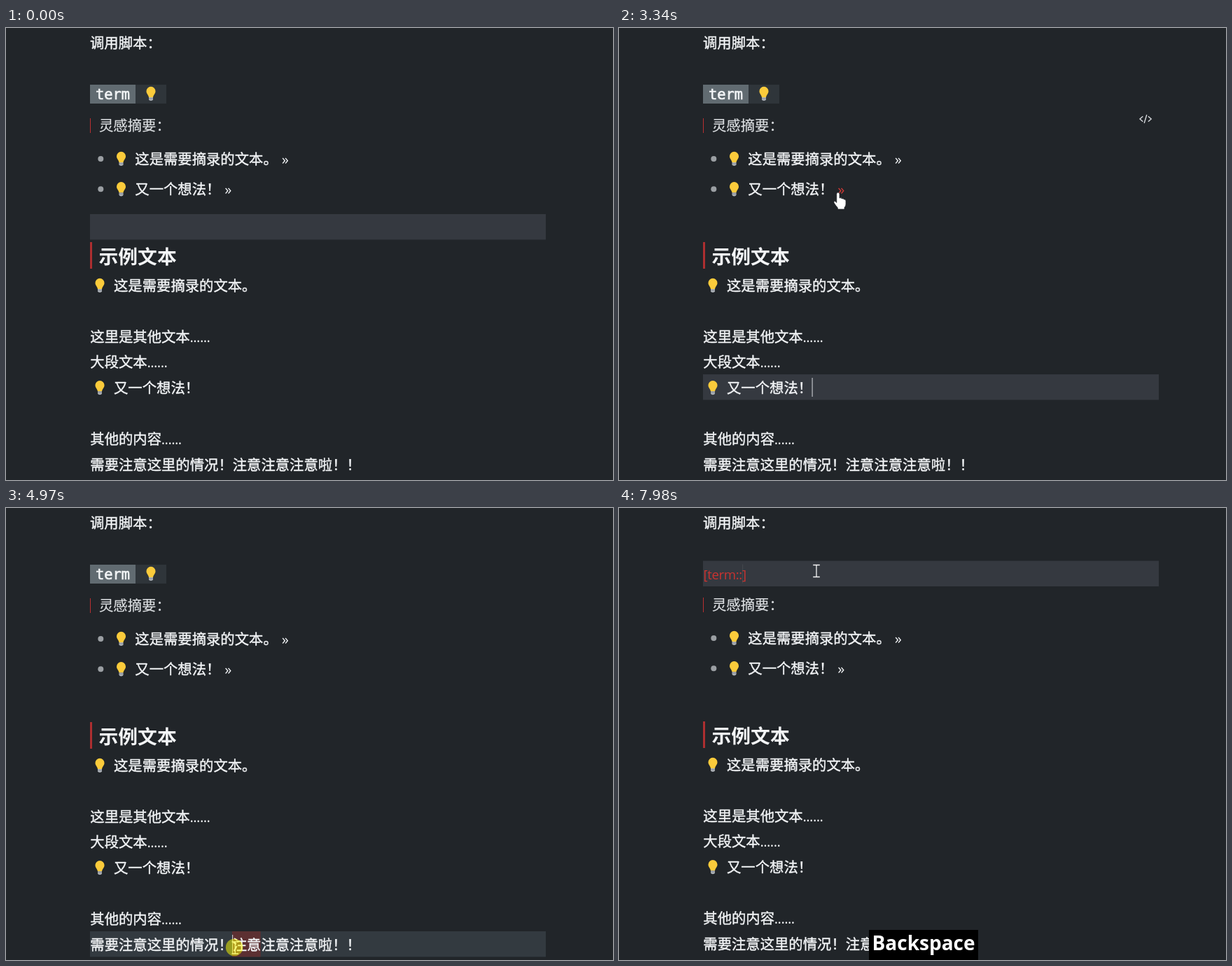
These frames come from a looping animation (867x646 px, 8000 ms). An HTML page:

```html
<!DOCTYPE html>
<html lang="zh-CN">
<head>
<meta charset="utf-8">
<title>灵感摘要</title>
<style>
html, body { margin: 0; width: 100%; height: 100%; overflow: hidden; background: #212529; }
svg { position: absolute; left: 0; top: 0; display: block; }
text {
  font: 500 20.35px "Noto Sans CJK SC", "Noto Sans CJK", "Noto Sans", sans-serif;
  fill: #f3f5f7; stroke: #f3f5f7; stroke-width: .4px;
}
.latin { font-family: "Open Sans", "Noto Sans", sans-serif; font-weight: 400; stroke: none; }
.dots { letter-spacing: -.6px; }
.dim { fill: #dcdfe2; stroke: #dcdfe2; stroke-width: .2px; }
.head { font-size: 27.8px; font-weight: 700; stroke: none; }
.mono { font-family: "DejaVu Sans Mono", monospace; font-weight: 400; stroke-width: .7px; }
.red { fill: #c93330; font-size: 18.6px; letter-spacing: -.35px; }
.hover { fill: #d13a36; }
#keys {
  position: absolute; left: 435px; top: 603px; height: 43px; padding: 0 4.5px;
  transform: translateX(-50%); background: #000; color: #fff; white-space: pre;
  font: 700 28px/43px "Open Sans", "Noto Sans", sans-serif; word-spacing: 4px;
}
</style>
</head>
<body>
<svg width="867" height="646" viewBox="0 0 867 646">
  <defs>
    <g id="bulb" transform="scale(.93 .97)">
      <path d="M-7 -3.6A7 6.9 0 0 1 7 -3.6C7 0 3.7 1.8 3.3 5.2H-3.3C-3.7 1.8 -7 0 -7 -3.6Z" fill="#fbcb3b"/>
      <path d="M-3.2 5.2H3.2V8.6Q2.6 10.4 0 10.4T-3.2 8.6Z" fill="#adb2b8"/>
      <path d="M-3.2 7.2H3.2" stroke="#858b92"/>
    </g>
  </defs>
  <rect id="active" x="120" width="651" height="36.5"/>
  <rect id="selection" y="605" height="36.5" fill="#5c3032"/>
  <text x="120" y="28.7">调用脚本：</text>
  <g id="badge">
    <rect x="120" y="81" width="65" height="27" fill="#616b71"/>
    <rect x="185" y="81" width="44" height="27" fill="#2f353a"/>
    <text class="mono" x="128" y="101.5">term</text>
    <use href="#bulb" x="207" y="94"/>
  </g>
  <g id="edit">
    <text class="latin red" x="120.5" y="101.5">[term::</text>
    <use id="idea" href="#bulb" x="193" y="94"/>
    <text id="close" class="latin red" y="101.5">]</text>
  </g>
  <g id="page">
    <rect x="120" y="129" width="1" height="21" fill="#b83030"/>
    <text class="dim" x="133" y="147.4">灵感摘要：</text>
    <rect x="120" y="306" width="3" height="38" fill="#ad2f30"/>
    <text class="head" x="132.5" y="336.7">示例文本</text>
  </g>
  <path id="code" d="M748.3 126.3L744 130L748.3 133.7M753.8 124L750.2 136M755.9 126.3L760.2 130L755.9 133.7" fill="none" stroke="#d5d8db" stroke-width="1.4"/>
  <rect id="caret" width="1.2" height="27" fill="#dfe2e5"/>
  <g id="cursor">
    <path id="beam" d="M-4.8 -8.5H4.8M0 -8.5V8.5M-4.8 8.5H4.8" fill="none" stroke="#f4f4f4" stroke-width="1.3"/>
    <path id="hand" d="M-2.2 2.2A2.1 2.1 0 0 1 2 2.2V8Q4.6 6.9 5.2 9Q7.7 8 8.3 10Q11 9.4 11 12V17Q11 19.6 9 21.5V24H-.6V22Q-3 19.4 -6 14.8Q-6.6 12.4 -4.4 12.6L-2.2 14.6Z" fill="#fff" stroke="#212529" stroke-width=".7"/>
    <circle id="press" cx="-1.2" cy="-.5" r="12.3" fill="#ff0" opacity=".5"/>
  </g>
</svg>
<div id="keys"></div>
<script>
const LOOP = 8000, EM = 20.35;
const $ = id => document.getElementById(id);
const show = (id, on) => $(id).style.display = on ? "" : "none";
const set = (el, attrs) => { for (const k in attrs) el.setAttribute(k, attrs[k]); };

function add(tag, attrs, text = "") {
  const el = document.createElementNS("http://www.w3.org/2000/svg", tag);
  set(el, attrs);
  el.textContent = text;
  return $("page").appendChild(el);
}
const bulb = (x, y) => add("use", { href: "#bulb", x, y });

// Summary list with a jump link after each idea
const links = ["这是需要摘录的文本。", "又一个想法！"].map((s, i) => {
  const y = 187 + 43.3 * i, x = 190.2 + s.length * EM;
  add("circle", { cx: 135.3, cy: y, r: 4, fill: "#9b9fa3" });
  bulb(164.5, y);
  add("text", { x: 184.3, y: y + 7.5 }, s);
  return { x: x + 5, y, el: add("text", { x, y: y + 7.5, class: "latin" }, "»") };
});

// Body lines; "*" marks an idea
["*这是需要摘录的文本。", "", "这里是其他文本......", "大段文本......", "*又一个想法！",
 "", "其他的内容......", "需要注意这里的情况！注意注意注意啦！！"].forEach((line, i) => {
  const y = 368 + 36.57 * i, idea = line[0] === "*";
  const s = line.replace(/[*.]/g, "");
  if (idea) bulb(134, y);
  add("text", { x: idea ? 154 : 120.3, y: y + 7.6 }, s);
  if (line.endsWith(".")) add("text", { x: 120 + s.length * EM, y: y + 7.6, class: "latin dots" }, "......");
});

// Pointer moves: start, end, x, y
const moves = [
  [0, 70, 824, 619], [70, 830, 394, 190], [1490, 2000, 322, 408], [2000, 2520, 313, 235],
  [3340, 4020, 348, 607], [4020, 4160, 356, 605], [4360, 4560, 364, 625], [4600, 4970, 327.3, 628.5],
  [5370, 6050, 284, 78], [6180, 6320, 288, 90], [6460, 6720, 282, 90]
];
function pointer(t) {
  let x = 824, y = 619;
  for (const [a, b, tx, ty] of moves) {
    const p = Math.min(1, Math.max(0, (t - a) / (b - a)));
    const k = (1 - Math.cos(Math.PI * p)) / 2;
    x += (tx - x) * k;
    y += (ty - y) * k;
  }
  return [x, y];
}

// Caret jumps: time, line top, caret x
const jumps = [
  [0, 266, -9], [1490, 348.5, 356.5], [3340, 495, 275.5], [4560, 605, 364], [4970, 605, 323],
  [6460, 75.5, 210.5], [6990, 75.5, 204], [7250, 75.5, 182], [7450, 75.5, 176]
];
const keys = [
  [0, ""], [5370, "Ctrl + C"], [6720, ""], [6920, "Left"],
  [7250, "Left \u00a0Backspace"], [7980, "Backspace"]
];
const presses = [[1090, 1220], [3010, 3070], [4560, 5370], [6320, 6460]];
const at = (rows, t) => rows.filter(r => r[0] <= t).pop();

function draw(t) {
  const [x, y] = pointer(t);
  const editing = t >= 6460, selecting = t >= 4560 && !editing;
  const [since, top, stop] = at(jumps, t);

  // The selection snaps to whole characters
  const left = 323 + EM * Math.min(2, Math.max(0, Math.round((x - 323) / EM)));
  const edge = t < 4970 ? left : 323;
  show("selection", selecting);
  set($("selection"), { x: edge, width: 323 + 2 * EM - edge });

  set($("active"), { y: top, fill: top === 348.5 || top === 605 ? "#333a40" : "#353940" });
  const lit = (t - since) % 1060 < 480;
  set($("caret"), { x: selecting ? edge : stop, y: top + 5, opacity: lit ? .8 : .08 });

  show("badge", !editing);
  show("edit", editing);
  show("idea", t < 7250);
  set($("close"), { x: Math.min(stop, 204) });
  set($("page"), { transform: `translate(0 ${editing ? -1 : 0})` });

  let hand = false;
  for (const l of links) {
    const over = Math.abs(x - l.x) < 8 && Math.abs(y - l.y) < 12;
    l.el.classList.toggle("hover", over);
    hand = hand || over;
  }
  show("code", x < 771 && y > 116 && y < 254);
  show("cursor", t >= 70);
  set($("cursor"), { transform: `translate(${x} ${y})` });
  show("hand", hand);
  show("beam", !hand);
  show("press", presses.some(([a, b]) => t >= a && t < b));

  const label = at(keys, t)[1];
  show("keys", label);
  $("keys").textContent = label;
  $("keys").style.lineHeight = label.endsWith("Backspace") ? "37px" : "43px";
}

const start = performance.now();
function frame() {
  draw((performance.now() - start) % LOOP);
  requestAnimationFrame(frame);
}
frame();
</script>
</body>
</html>
```
